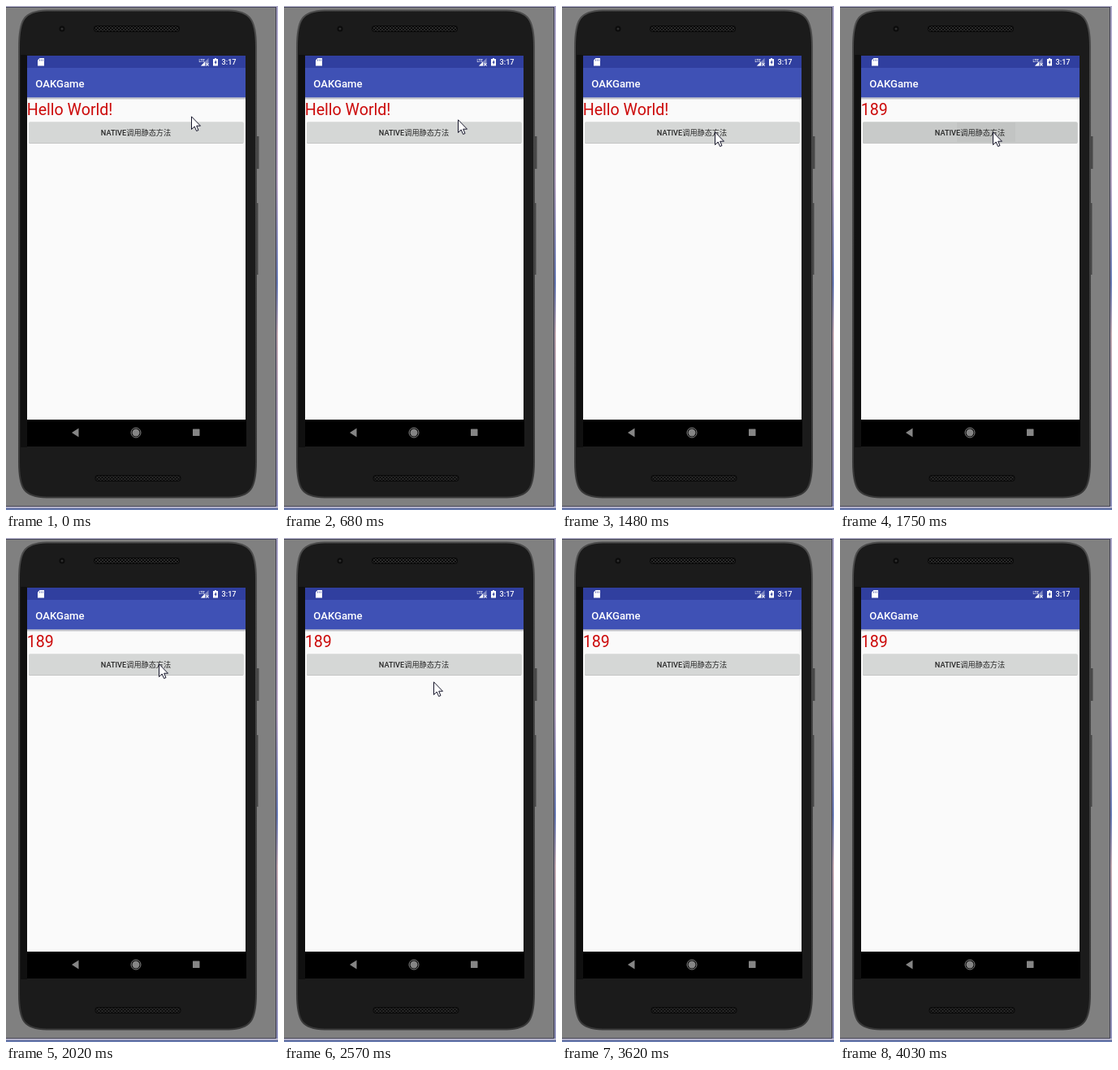
Write an HTML page that moves like this. It is 335 px wide and 619 px high and loops after 4130 ms.

```html
<!DOCTYPE html>
<html lang="en">
<head>
<meta charset="utf-8">
<title>Phone demo</title>
<style>
  html, body { margin: 0; width: 100%; height: 100%; overflow: hidden; background: #808080; }
  svg { display: block; width: 335px; height: 619px; }
  text { font-family: Roboto, "Noto Sans CJK SC", "Noto Sans CJK", sans-serif; }
  .medium { font-weight: 500; }
  .message { font-size: 19.6px; fill: #cc0a0a; }

  .before, .after, .button, .ripple, .cursor { animation: 4130ms step-end infinite; }
  .before { animation-name: before; }
  .after { animation-name: after; }
  .button { animation-name: press; }
  .ripple { animation-name: ripple; }
  .cursor { animation-name: move; }

  @keyframes before { 0% { opacity: 1 } 42.37%, 100% { opacity: 0 } }
  @keyframes after { 0% { opacity: 0 } 42.37%, 100% { opacity: 1 } }
  @keyframes press {
    0% { fill: #d5d7d6 }
    39.46% { fill: #d0d2d1 }
    42.37% { fill: #c8cac9 }
    48.91%, 100% { fill: #d5d7d6 }
  }
  @keyframes ripple { 0% { opacity: 0 } 42.37% { opacity: 1 } 48.91%, 100% { opacity: 0 } }
  @keyframes move {
    0% { transform: translate(228px, 135px) }
    16.46% { transform: translate(214px, 139px) }
    20.09% { transform: translate(191px, 152px) }
    23% { transform: translate(188px, 154px) }
    62.22% { transform: translate(184px, 176px) }
    65.13% { transform: translate(211px, 272px) }
    68.76% { transform: translate(277px, 436px) }
    71.67% { transform: translate(318px, 532px) }
    74.57% { transform: translate(321px, 541px) }
    78.2% { transform: translate(324px, 570px) }
    81.84% { transform: translate(317px, 584px) }
    84.74% { transform: translate(305px, 603px) }
    87.65%, 100% { transform: translate(340px, 625px) }
  }
</style>
</head>
<body>
<svg viewBox="0 0 335 619">
  <defs>
    <linearGradient id="edge" x2="0" y2="1">
      <stop offset="0" stop-color="#aaa6c8"/>
      <stop offset=".35" stop-color="#b9a9c4"/>
      <stop offset=".55" stop-color="#6d7fb8"/>
      <stop offset=".65" stop-color="#c0a8b0"/>
      <stop offset="1" stop-color="#8f92bd"/>
    </linearGradient>
    <linearGradient id="rim" x2="0" y2="1">
      <stop offset="0" stop-color="#4c4c4c"/>
      <stop offset="1" stop-color="#383838"/>
    </linearGradient>
    <linearGradient id="shadow" x2="0" y2="1">
      <stop offset="0" stop-color="#a9aab4"/>
      <stop offset="1" stop-color="#fafafa"/>
    </linearGradient>
    <pattern id="mesh" width="4" height="4" patternUnits="userSpaceOnUse">
      <path d="M0 0h2v2H0zM2 2h2v2H2z" fill="#2b2b2b"/>
    </pattern>
    <g id="grille">
      <rect width="106" height="8" rx="4" fill="#090909"/>
      <rect x="1" y="1" width="104" height="6" rx="3" fill="url(#mesh)"/>
    </g>
  </defs>

  <!-- window frame -->
  <rect width="335" height="619" fill="#808080"/>
  <path d="M0 .5H335" stroke="#c3c1d8"/>
  <path d="M0 1.5H333" stroke="#44445c"/>
  <rect x="333" width="2" height="619" fill="url(#edge)"/>
  <path d="M332.5 2V614.5H0" fill="none" stroke="#3c3c50"/>
  <path d="M0 615.5H335" stroke="#dcdaea"/>
  <path d="M0 616.5H335" stroke="#8082a8"/>
  <path d="M0 618H335" stroke="#6678ac" stroke-width="2"/>

  <!-- phone body -->
  <path d="M308 160h3.500v40H308zM308 242h2.500v88H308z" fill="#484848"/>
  <path d="M16 50C16 17 22 6 50 5.500H274C301 6 308 17 308 50V560C308 593 301 603 274 603.500H50C22 603 16 593 16 560Z"
        fill="#1b1b1b" stroke="url(#rim)" stroke-width="2"/>
  <path d="M18 60h8v482h-8z" fill="#101010"/>
  <circle cx="69" cy="28" r="3.500" fill="#0b0b0b"/>
  <circle cx="69" cy="28" r="1.500" fill="#303030"/>
  <use href="#grille" x="108" y="24"/>
  <use href="#grille" x="109.500" y="576"/>

  <!-- screen -->
  <path d="M26 61h269v452H26z" fill="#fafafa"/>
  <path d="M26 61h269v15.500H26z" fill="#303f9f"/>
  <path d="M26 76h269v36.500H26z" fill="#3f51b5"/>
  <path d="M26 112.500h269v3H26z" fill="url(#shadow)"/>
  <path d="M26 508h270v33H26z" fill="#000"/>

  <!-- status bar -->
  <g fill="#fff">
    <path d="M41.500 64H47v9.500H39V66.500Z"/>
    <path d="M41.500 65.500v2M43.500 65.500v2M45.500 65.500v2" stroke="#303f9f" stroke-width=".7"/>
    <text class="medium" x="237.500" y="69" font-size="4.500">LTE</text>
    <path d="M249.500 64V73.500H240Z" opacity=".4"/>
    <path d="M245 68.500V73.500H240Z"/>
    <path d="M246.500 70l3 3.500m0-3.500l-3 3.500" stroke="#fff"/>
    <path d="M257 64h2v1h2v8.500h-6V65h2z"/>
    <path d="M258.700 66l-2.200 3.800h1.300v2.400l2-3.700h-1.100z" fill="#303f9f"/>
    <text class="medium" x="265.500" y="72" font-size="9.160">3:17</text>
    <text class="medium" x="36.300" y="99.500" font-size="13.100">OAKGame</text>
  </g>

  <!-- content -->
  <text class="message before" x="25.700" y="134">Hello World!</text>
  <text class="message after" x="25.700" y="134">189</text>
  <rect x="28" y="143" width="264.500" height="26" rx="1.500" fill="#c4c5c5"/>
  <rect class="button" x="28" y="142.300" width="264.500" height="25.700" rx="1.500"/>
  <rect class="ripple" x="144" y="143" width="72" height="24" fill="#c2c4c3"/>
  <text x="160" y="158.600" font-size="9.160" text-anchor="middle" fill="#262626"><tspan class="medium">NATIVE</tspan><tspan>调用静态方法</tspan></text>

  <!-- navigation bar -->
  <g fill="#858585">
    <path d="M81 524l8.500-5.500v11z"/>
    <circle cx="160" cy="524" r="4.500"/>
    <circle cx="160" cy="524" r="6" fill="none" stroke="#858585"/>
    <rect x="230" y="519.500" width="8.500" height="8.500" rx=".5"/>
  </g>

  <path class="cursor" d="M.5 .8V16.500L4.200 13 6.600 18.500 9 17.500 6.700 12.200H11.500Z" fill="#fff" stroke="#15152a"/>
</svg>
</body>
</html>
```
